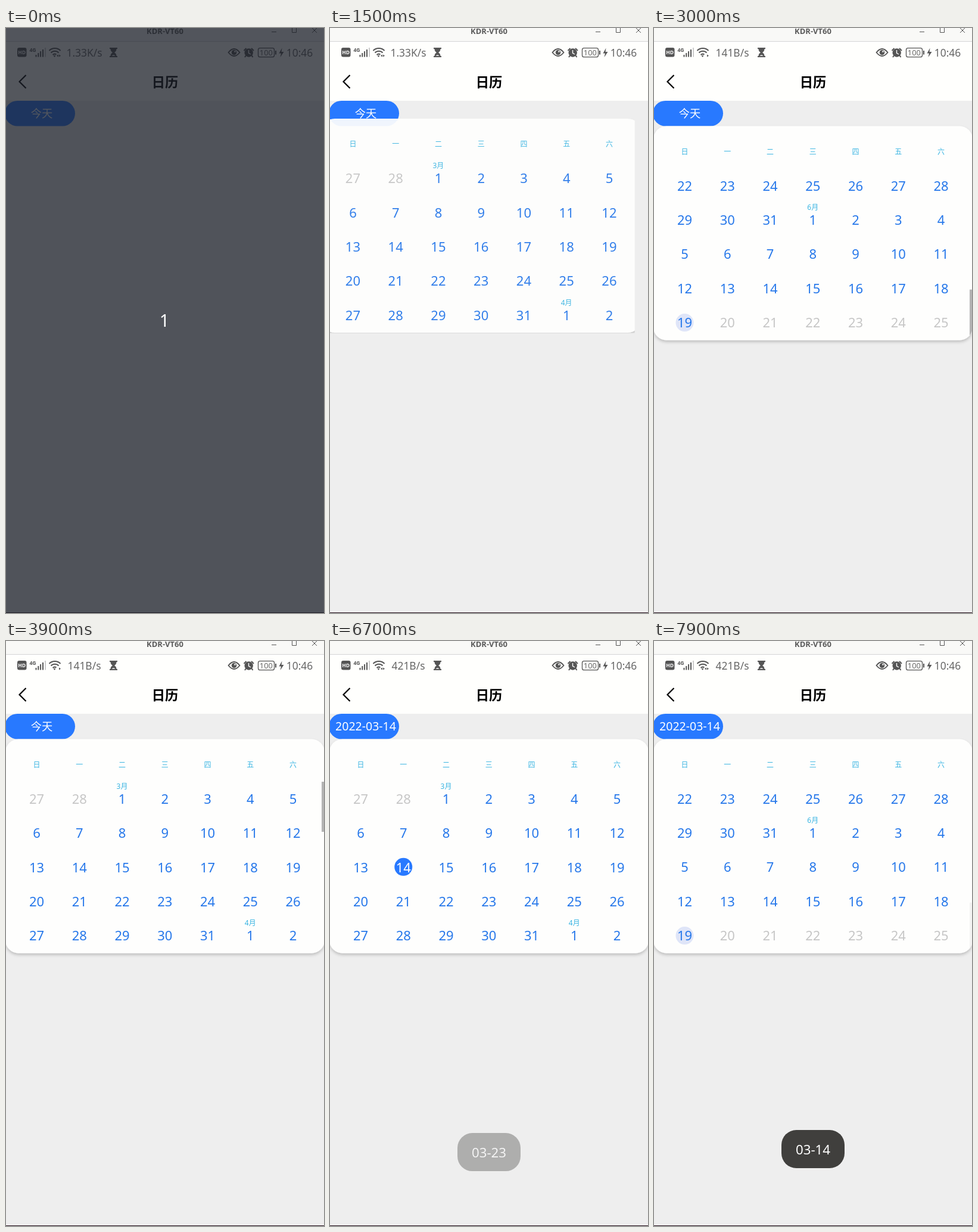
Recreate the animation shown at these times as an HTML page. Size 534x981 px, loop 8 s.

```html
<!DOCTYPE html>
<html lang="zh-CN">
<head>
<meta charset="utf-8">
<title>日历</title>
<style>
html, body { margin: 0; width: 100%; height: 100%; overflow: hidden; background: #eee; }
svg { display: block; width: 534px; height: 981px; font-family: 'Noto Sans', 'Noto Sans CJK SC', 'Noto Sans CJK', sans-serif; }
text { text-anchor: middle; }
.status { font-size: 17.4px; fill: #666; }
.day { font-size: 22px; fill: #2577ea; }
.off { fill: #c6c6c6; }
.on { fill: #fff; }
.small { font-size: 12px; fill: #38b4e2; }
.line { fill: none; stroke: #555; }
</style>
</head>
<body>
<svg viewBox="0 0 534 981">
  <defs>
    <clipPath id="reveal"><rect id="revealBox"/></clipPath>
    <clipPath id="listClip"><path d="M-1 236H535V501.500a22 22 0 0 1-22 22H21a22 22 0 0 1-22-22Z"/></clipPath>
    <filter id="shadow" x="-5%" y="-5%" width="110%" height="112%"><feDropShadow dx="0" dy="3" stdDeviation="2.500" flood-opacity=".2"/></filter>
  </defs>
  <rect width="534" height="981" fill="#eee"/>
  <rect y="980" width="534" height="1" fill="#2a1420"/>
  <rect width="534" height="122" fill="#fffffd"/>

  <!-- window bar -->
  <rect width="534" height="22" fill="#f9f9f7"/>
  <rect y="22" width="534" height="1" fill="#d5d5d5"/>
  <text x="267" y="10" font-size="13" font-weight="700" fill="#5a5a5a">KDR-VT60</text>
  <path class="line" d="M446 6.500h8M480.500-.5h7v8h-7zM514 0l8 8M522 0l-8 8"/>

  <!-- status bar -->
  <rect x="19" y="33" width="15.500" height="15.500" rx="3" fill="#555"/>
  <text x="26.700" y="44" font-size="8.500" font-weight="700" fill="#fff">HD</text>
  <text x="45" y="40" font-size="8.500" font-weight="700" fill="#555" textLength="">4G</text>
  <path d="M49.500 45h2v3.500h-2zM53.300 42h2v6.500h-2zM57.100 39h2v9.500h-2zM61 36h2v12.500h-2z" fill="#555"/>
  <path d="M65 33h2v15.500h-2z" fill="#ccc"/>
  <path class="line" stroke-width="2" d="M72.500 38a13.500 13.500 0 0 1 19 0M75.500 41.500a9 9 0 0 1 13 0M78.500 45a5 5 0 0 1 6 -.5"/>
  <path d="M79.500 46h4l-2 3zM89 44.500l3 2-3 2z" fill="#555"/>
  <path id="arrow" d="M88 44.500l-3 2 3 2z" fill="#555"/>
  <text id="speed" class="status" x="131.500" y="48"></text>
  <path d="M174 33h13v2h-1.500q0 4-3.500 6q3.500 2 3.500 6h1.500v2h-13v-2h1.500q0-4 3.500-6q-3.500-2-3.500-6h-1.500z" fill="#555"/>
  <path d="M177.500 47q3-4 6 0z" fill="#ddd"/>
  <path class="line" stroke-width="1.800" d="M373.500 41q9.500-12 19 0q-9.500 12-19 0z"/>
  <circle cx="383" cy="41" r="4.300" fill="#555"/>
  <circle cx="384.500" cy="39.500" r="1.300" fill="#fff"/>
  <circle cx="407.700" cy="41.500" r="7.200" fill="#555"/>
  <path class="line" stroke-width="2" d="M399.500 38l4-4M416 38l-4-4M403 46l-2 3M412.500 46l2 3"/>
  <path d="M407.500 37v5l3.500 2" fill="none" stroke="#fff" stroke-width="1.400"/>
  <rect class="line" x="423.500" y="33.700" width="27" height="15" rx="3" stroke-width="1.300"/>
  <path d="M452 38h2v6.500h-2zM463.500 33.500l-5 9h3.500l-1.500 6.500 6-9h-4z" fill="#555"/>
  <text x="436.800" y="46" font-size="12.800" fill="#666">100</text>
  <text class="status" x="493" y="48">10:46</text>

  <path d="M33.500 79L22.500 90l11 11" fill="none" stroke="#000" stroke-width="2.200"/>
  <text x="267" y="98.700" font-size="22.300" font-weight="700">日历</text>

  <rect x="-2" y="122" width="118" height="42.500" rx="21.200" fill="#2879ff"/>
  <text id="button" x="60" y="150" fill="#fff"></text>

  <g id="panel"><g clip-path="url(#reveal)">
    <rect x="-1" y="164.500" width="536" height="359" rx="22" fill="#fefefd" filter="url(#shadow)"/>
    <g id="week"></g>
    <g clip-path="url(#listClip)">
      <g id="list"></g>
      <rect id="bar" x="530" width="4" height="84" fill="#b4b4b4"/>
    </g>
  </g></g>

  <g id="toast">
    <rect x="214" y="820" width="106" height="64" rx="25" fill="#403f3d"/>
    <text id="toastText" x="267" y="861" font-size="22.300" fill="#fff"></text>
  </g>

  <g id="countdown">
    <rect width="534" height="981" fill="#1b1f28" opacity=".75"/>
    <text x="266" y="501" font-size="29" fill="#fff">1</text>
  </g>
</svg>
<script>
const $ = id => document.getElementById(id);
const set = (el, attrs) => { for (const k in attrs) el.setAttribute(k, attrs[k]); };

const ROW = 57.4, TOP = 236, WEEKS = 17, BOTTOM = (WEEKS - 5) * ROW, FIRST = 2, TODAY = 112;
const colX = i => 51.5 + 71.75 * (i % 7);

$('week').innerHTML = [...'日一二三四五六']
  .map((c, i) => `<text class="small" x="${colX(i)}" y="211.500">${c}</text>`).join('');

let days = `<circle cx="${colX(TODAY)}" cy="${TOP + 16 * ROW + 28.5}" r="15" fill="#dfe5f8"/><circle id="pick" r="15" fill="#2879ff"/>`;
for (let i = 0; i < WEEKS * 7; i++) {
  const date = new Date(2022, 1, 27 + i), x = colX(i), y = TOP + Math.floor(i / 7) * ROW;
  const off = i < FIRST || i > TODAY ? ' off' : '';
  if (date.getDate() === 1) days += `<text class="small" x="${x}" y="${y + 11.8}">${date.getMonth() + 1}月</text>`;
  days += `<text id="d${i}" class="day${off}" x="${x}" y="${y + 36.7}">${date.getDate()}</text>`;
}
$('list').innerHTML = days;

// linear track through [time, value] points
function track(t, points) {
  let [t0, v0] = points[0];
  for (const [t1, v1] of points) {
    if (t < t1) return t1 === t0 ? v0 : v0 + (v1 - v0) * Math.max(0, (t - t0) / (t1 - t0));
    [t0, v0] = [t1, v1];
  }
  return v0;
}

const scrollTrack = [[2500, 0], [2600, 21.3], [2800, 450], [2900, 620], [3000, BOTTOM],
  [3400, BOTTOM], [3500, 640], [3700, 230], [3800, 60], [3900, 0],
  [6700, 0], [6800, 30], [7000, 400], [7100, 540], [7200, 630], [7400, BOTTOM]];
const barTrack = [[2500, 0], [2600, 1], [4200, 1], [4500, 0], [6700, 0], [6800, 1], [7600, 1], [7900, .13]];
const toastTrack = [[4600, 0], [4900, 1], [6600, 1], [6700, .36], [6800, 0], [6900, .4], [7000, 1]];

function draw(t) {
  $('countdown').style.display = t < 100 ? '' : 'none';
  $('arrow').style.display = t >= 1900 && t < 4700 ? 'none' : '';
  $('speed').textContent = t < 2800 ? '1.33K/s' : t < 6000 ? '141B/s' : '421B/s';

  const picked = t < 4700 ? 0 : t < 6000 ? 23 : 14;
  $('button').textContent = picked ? '2022-03-' + picked : '今天';
  set($('button'), { 'font-size': picked ? 19.5 : 18.3 });
  for (const n of [14, 23]) $('d' + (n + 1)).classList.toggle('on', n === picked);
  const i = picked + 1;
  set($('pick'), { cx: colX(i), cy: TOP + Math.floor(i / 7) * ROW + 28, opacity: picked ? 1 : 0 });

  // the panel unfolds out of the button
  const open = t < 1300 ? 0 : t < 1600 ? 1 - ((1600 - t) / 400) ** 2 : 1;
  set($('panel'), { opacity: open, transform: `translate(${-209 * (1 - open)} ${-201 * (1 - open)})` });
  set($('revealBox'), { x: 267 - 275 * open, y: 344 - 192 * open, width: 550 * open, height: 384 * open });

  const y = track(t, scrollTrack);
  set($('list'), { transform: `translate(0 ${-y})` });
  set($('bar'), { y: TOP + y * 5 / WEEKS, opacity: track(t, barTrack) });

  const alpha = track(t, toastTrack);
  $('toastText').textContent = t < 6800 ? '03-23' : '03-14';
  set($('toast'), { opacity: alpha, transform: `translate(0 ${8 * (1 - alpha)})` });
}

function frame() {
  draw(Math.floor(performance.now() % 8000 / 100) * 100);
  requestAnimationFrame(frame);
}
frame();
</script>
</body>
</html>
```
